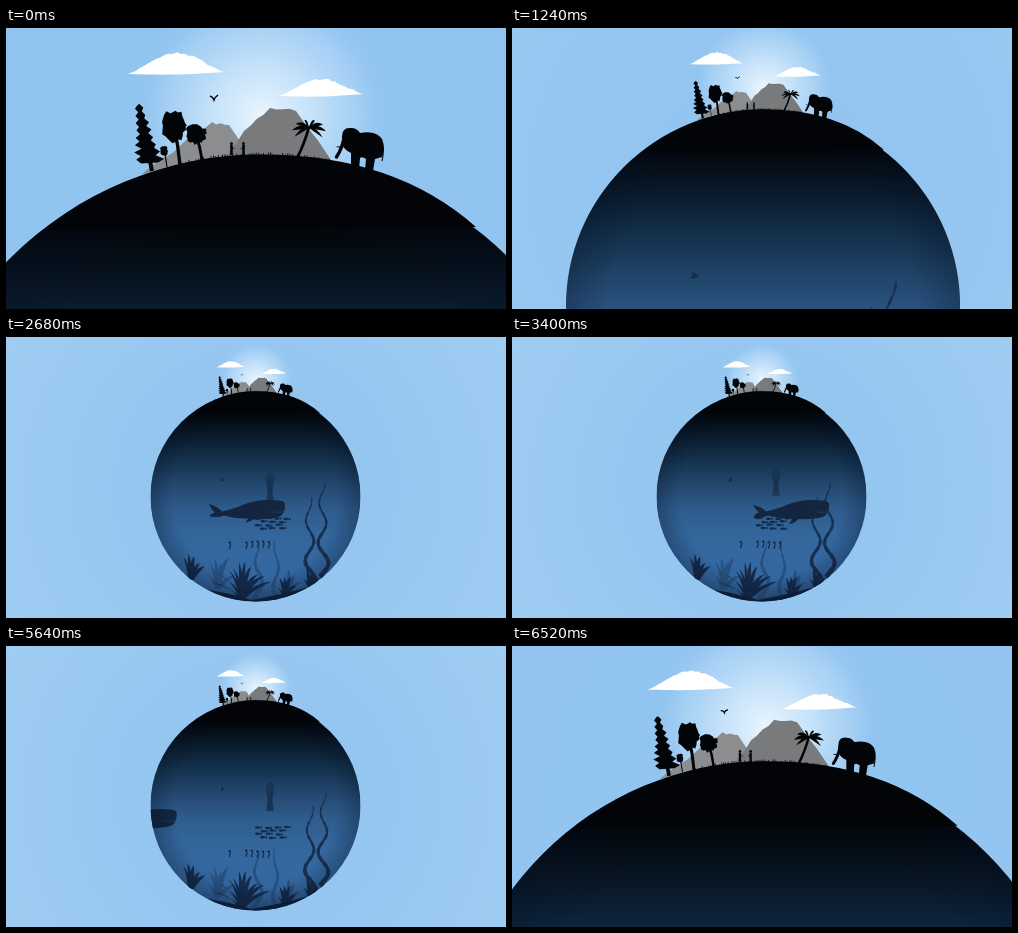
Animation of 500x281 px, one loop 6600 ms. Source, as an HTML page with a canvas:

```html
<!DOCTYPE html>
<html lang="en">
<head>
<meta charset="utf-8">
<title>Small planet</title>
<style>
html, body { margin: 0; width: 100%; height: 100%; overflow: hidden; background: #92c4f0; }
canvas { display: block; width: 100vw; height: 100vh; }
</style>
</head>
<body>
<canvas id="stage" width="500" height="281"></canvas>
<script>
const ctx = document.getElementById('stage').getContext('2d');
const LOOP = 6600, HOLD = 1000, STEP = 80;
const MAX = 3.36;                       // closest zoom
const FX = 247.75, FY = 23.8;           // fixed point of the zoom
const CX = 249.5, CY = 159.5, R = 105;  // planet at zoom 1
const INK = '#020407', DEEP = '#142a49', KELP = '#18304f', PALE = '#28507f';
const TAU = Math.PI * 2;

const clamp = v => Math.max(0, Math.min(1, v));
const ease = v => (1 - Math.cos(Math.PI * clamp(v))) / 2;
const mix = (a, b, u) => a + (b - a) * u;

// Repeatable noise in 0..1
function noise(n) {
  const v = Math.sin(n * 12.9898) * 43758.5453;
  return v - Math.floor(v);
}

function zoomAt(t) {
  const near = t < LOOP / 2 ? 1 - ease((t - 965) / 564) : ease((t - 6069) / 564);
  return { near, s: Math.pow(MAX, near) };
}

// Slow drift of the small creatures: out, then back
function driftAt(t) {
  return Math.min(clamp((t - 1300) / 3380), clamp((6200 - t) / 1400));
}

function view(k) {
  ctx.setTransform(k, 0, 0, k, FX * (1 - k), FY * (1 - k));
}

function fill(d, color) {
  ctx.fillStyle = color;
  ctx.fill(new Path2D(d));
}

function stroke(d, width, color) {
  ctx.strokeStyle = color;
  ctx.lineWidth = width;
  ctx.stroke(new Path2D(d));
}

function poly(points, color) {
  ctx.fillStyle = color;
  ctx.beginPath();
  points.forEach(([x, y]) => ctx.lineTo(x, y));
  ctx.fill();
}

function oval(x, y, rx, ry, color) {
  ctx.fillStyle = color;
  ctx.beginPath();
  ctx.ellipse(x, y, rx, ry, 0, 0, TAU);
  ctx.fill();
}

function radial(x, y, r0, r1, stops) {
  const g = ctx.createRadialGradient(x, y, r0, x, y, r1);
  stops.forEach(([p, c]) => g.addColorStop(p, c));
  return g;
}

// Pointed leaf bending from its root to its tip
function blade(x, y, tx, ty, w, color) {
  const mx = mix(x, tx, .4), my = mix(ty, y, .12);
  fill(`M${x - w} ${y} Q${mx - w} ${my} ${tx} ${ty} Q${mx + w} ${my + w * 2} ${x + w} ${y}Z`, color);
}

// ---------- sky and land, laid out at the closest zoom ----------
function drawSky(near) {
  ctx.setTransform(1, 0, 0, 1, 0, 0);
  ctx.fillStyle = '#92c4f0';
  ctx.fillRect(0, 0, 500, 281);
  ctx.globalAlpha = 1 - near;
  ctx.fillStyle = radial(250, 150, 90, 290, [[0, 'rgba(150,199,240,.5)'], [1, 'rgba(166,208,241,.7)']]);
  ctx.fillRect(0, 0, 500, 281);
  ctx.globalAlpha = 1;
}

function drawGlow() {
  ctx.fillStyle = radial(256, 88, 0, 130, [
    [0, 'rgba(245,251,255,.9)'], [.4, 'rgba(220,239,254,.68)'],
    [.75, 'rgba(185,220,248,.45)'], [1, 'rgba(146,196,240,0)']]);
  ctx.fillRect(110, -50, 290, 290);
}

function cloud(x, y, w, h, seed) {
  const top = [], base = [];
  for (let i = 0; i <= 24; i++) {
    const u = i / 24, jag = noise(seed + i);
    const hump = Math.pow(Math.sin(Math.PI * u), 1.3);
    top.push([x + w * u + 3 * (jag - .5), y - 2 * u - h * hump * (.85 + .15 * jag)]);
    base.unshift([x + w * u, y - 2 * u + 1.5 * Math.sin(Math.PI * u)]);
  }
  poly(top.concat(base), '#fff');
}

function drawBird(t) {
  const wing = t < HOLD ? -2 : Math.sin(t / 130) * 2;
  stroke(`M204 ${70 + wing} Q207 69 208 72 Q209 69 212 ${69 + wing}`, 1.5, INK);
}

// Rough ridge through a few key points
function ridge(keys, seed, color) {
  const points = [];
  for (let i = 1; i < keys.length; i++) {
    const [ax, ay] = keys[i - 1], [bx, by] = keys[i];
    for (let k = 0; k < 4; k++) {
      points.push([mix(ax, bx, k / 4), mix(ay, by, k / 4) + (k ? 4 * noise(seed + i * 4 + k) - 2 : 0)]);
    }
  }
  points.push(keys[keys.length - 1]);
  poly(points, color);
}

function drawMountains() {
  ridge([[136, 146], [177, 115], [206, 94], [223, 97], [262, 150]], 3, '#8c8d8e');
  ridge([[207, 146], [238, 103], [264, 80], [290, 83], [334, 146]], 9, '#787a7b');
}

function drawHill() {
  fill('M40 202 Q140 126 254 126.5 Q388 126 470 199Z', INK);
}

function drawGrass() {
  for (let x = 176; x < 326; x += 2.4) {
    const y = 127 + (x - 254) ** 2 / 700;
    stroke(`M${x} ${y + 2} l${noise(x) - .5} ${-2 - 3 * noise(x + 1)}`, .9, INK);
  }
}

function conifer(x, y, h, lean) {
  const left = [], right = [];
  for (let i = 0; i <= 16; i++) {
    const u = i / 16;
    const w = i % 2 ? 3 + 11 * u : 1 + 7 * u;
    const cy = y - h + u * h * .86, cx = x - lean * (y - cy);
    left.push([cx - w * (.85 + .3 * noise(i)), cy + 2]);
    right.unshift([cx + w * (.85 + .3 * noise(i + 40)), cy + 1]);
  }
  poly(left.concat(right), INK);
  stroke(`M${x - lean * h / 2} ${y - h / 2} L${x} ${y}`, 4, INK);
}

function roundTree(x, y, rx, ry, rootX, rootY, seed) {
  const crown = [];
  for (let a = 0; a < TAU; a += TAU / 26) {
    const k = .82 + .32 * noise(seed + a);
    crown.push([x + rx * k * Math.cos(a), y + ry * k * Math.sin(a)]);
  }
  poly(crown, INK);
  stroke(`M${x} ${y} Q${mix(x, rootX, .7)} ${mix(y, rootY, .5)} ${rootX} ${rootY}`, rx * .28, INK);
}

function drawPalm() {
  const x = 303, y = 99;
  stroke(`M291 130 Q298 117 ${x} ${y}`, 2.8, INK);
  for (let i = 0; i < 8; i++) {
    const a = -3.7 + i * .62;
    const tx = x + 17 * Math.cos(a), ty = y + 4 + 11 * Math.sin(a);
    const mx = mix(x, tx, .55), my = mix(y, ty, .5) - 3;
    fill(`M${x} ${y} Q${mx} ${my - 3} ${tx} ${ty} Q${mx} ${my + 4} ${x} ${y + 1}Z`, INK);
  }
}

function person(x, reach) {
  oval(x, 115.5, 1.4, 1.5, INK);
  stroke(`M${x} 117 V127`, 2.6, INK);
  stroke(`M${x} 119 l${reach} 2`, .8, INK);
}

function drawElephant(t) {
  const lift = ease((t - 3600) / 900) - ease((t - 4900) / 700);
  fill('M336 109 Q336 99 345 100 Q351 100 354 105 Q370 102 376 111 Q380 121 376 129 L369 131 L367 143 L359 143 L360 131 Q356 128 354 130 L353 142 L345 142 L345 125 Q338 122 336 116Z', INK);
  stroke('M374 112 Q379 122 376 133', 1.1, INK);
  ctx.lineCap = 'round';
  stroke(`M338.5 108 Q336 ${121 - 4 * lift} ${330.5 + 2 * lift} ${129 - 23 * lift}`, 3.4, INK);
  stroke('M338 117 Q334 120 331 119', 1, INK);
  ctx.lineCap = 'butt';
}

function drawLand(t) {
  drawHill();
  drawGrass();
  conifer(146, 143, 68, .2);
  roundTree(168, 98, 12, 16, 174, 137, 5);
  roundTree(190, 106, 10, 10, 196, 132, 12);
  roundTree(158, 123, 4, 5, 161, 139, 20);
  drawPalm();
  person(225.5, 3);
  person(237.5, -3);
  drawElephant(t);
}

// ---------- sea, laid out at zoom 1 ----------
function drawWater() {
  const g = ctx.createLinearGradient(0, CY - R, 0, CY + R);
  ['#010204', '#03070c', '#0a1d30', '#15334f', '#23486f', '#2e5b8b', '#33659a', '#3568a0', '#34669e', '#2c5888']
    .forEach((c, i, all) => g.addColorStop(i / (all.length - 1), c));
  ctx.fillStyle = g;
  ctx.fillRect(CX - R, CY - R, 2 * R, 2 * R);
}

// Wavy weed from its root up to its tip
function weed(x, root, tip, amp, width, color, t, phase) {
  ctx.strokeStyle = color;
  ctx.lineCap = 'round';
  let px = x, py = root;
  for (let y = root - 2; y >= tip; y -= 2) {
    const u = (root - y) / (root - tip);
    const nx = x + amp * Math.sin(y / 6.4 + phase) * (1 - .6 * u) + u * Math.sin(t / 700 + y / 25);
    ctx.lineWidth = width * (1.05 - .85 * u) + .5 * Math.sin(y * .9);
    ctx.beginPath();
    ctx.moveTo(px, py);
    ctx.lineTo(nx, y);
    ctx.stroke();
    px = nx; py = y;
  }
  ctx.lineCap = 'butt';
}

// Fan of leaves with uneven lengths
function fern(x, y, count, spread, height, color, t) {
  for (let i = 0; i < count; i++) {
    const side = 2 * i / (count - 1) - 1;
    const h = height * (1 - .45 * side * side) * (.7 + .4 * noise(x + i));
    blade(x, y, x + side * spread + .5 * Math.sin(t / 600 + i), y - h, 2.3, color);
  }
}

function drawBackWeeds(t) {
  weed(252, 264, 206, 5, 5, PALE, t, 1);
  weed(270, 262, 203, 3.5, 4, PALE, t, 3.4);
  fern(212, 252, 6, 17, 34, PALE, t);
  fern(283, 255, 5, 11, 22, PALE, t);
}

function drawFrontWeeds(t) {
  weed(304, 252, 160, 6, 4.2, KELP, t, 1.2);
  weed(317, 240, 145, 6, 4, KELP, t, 4);
  fern(185, 243, 6, 14, 27, DEEP, t);
  fern(236, 262, 10, 29, 38, DEEP, t);
  fern(279, 259, 5, 11, 25, DEEP, t);
  fern(304, 250, 4, 9, 20, DEEP, t);
  fill('M190 251 Q220 255 246 263 Q278 257 306 249 L290 270 L210 270Z', '#10233f');
}

function drawOctopus(t, drift) {
  const x = 264, y = 167 - 39 * Math.sqrt(drift);
  const open = clamp(1 - 4 * drift);
  ctx.globalAlpha = 1 - .7 * drift;
  oval(x, y, 4.4 + open, 6, KELP);
  ctx.lineCap = 'round';
  for (let i = 0; i < 6; i++) {
    const side = (i - 2.5) / 2.5;
    const wave = Math.sin(t / 260 + i * 2) * 1.5 * open;
    const tip = x + side * (3 + 7 * open) + wave;
    stroke(`M${x + side * 3} ${y + 4} Q${x + side * (1 + 9 * open)} ${y + 11} ${x + side * (2 + 4 * open)} ${y + 16} T${tip} ${y + 22}`, 1.9, KELP);
  }
  ctx.lineCap = 'butt';
  if (open > .5) [-2, 2].forEach(dx => oval(x + dx, y + 2, 1, 1, '#3d6494'));
  ctx.globalAlpha = 1;
}

function drawSchool(t, drift) {
  for (let i = 0; i < 13; i++) {
    const row = i % 4, col = Math.floor(i / 4);
    const x = 261 - 24 * drift + col * 9.5 + (row % 2) * 4 + 2 * noise(i);
    const y = 181.5 + row * 3.3 + .5 * Math.sin(t / 300 + i * 2);
    oval(x, y, 2.7, 1.25, DEEP);
    fill(`M${x + 2} ${y} l2.4 -1.4 v2.8Z`, DEEP);
  }
}

function seahorse(x, y) {
  oval(x, y, 1.3, 1, DEEP);
  stroke(`M${x} ${y} q1.6 3 0 4.5 q-1 1.5 .6 1.6`, 1.1, DEEP);
}

function drawSeahorses(t, drift) {
  const x = 214 + 24 * drift;
  for (let i = 0; i < 6; i++) {
    seahorse(x + (i ? 11 + i * 5.6 : 0), 205 + .6 * Math.sin(t / 350 + i));
  }
}

function drawRay(t, drift) {
  const x = 213 + 9 * drift, flap = Math.sin(t / 220);
  fill(`M${x + 2.5} 143 L${x - 1.5} ${140.5 - flap} L${x - 1} 143 L${x - 2} ${145 + flap} L${x} 144.5Z`, DEEP);
}

// Swims out past the right edge and comes in again on the left
function whaleX(t) {
  return t < 5400
    ? 169 + 110 * ease((t - 1500) / 3200) + 80 * clamp((t - 4700) / 700)
    : 66 + 101 * clamp((t - 5400) / 880);
}

function drawWhale(t) {
  const beat = Math.sin(t / 260) * 1.2, color = '#13253f';
  ctx.save();
  ctx.translate(whaleX(t), 172.5);
  fill(`M77 -6 Q76 -9 70 -9 Q50 -11 36 -5 Q24 0 14 2 Q11 -2 1 ${-5 + beat} Q3 0 7 3 Q1 5 2 ${8 + beat} Q10 9 16 6 Q26 9 38 9 Q60 11 72 7 Q78 3 77 -6Z`, color);
  fill(`M48 7 Q45 ${13 + beat} 37 ${14 + beat} Q40 11 41 7Z`, color);
  stroke('M76 2 Q70 4 63 2', .5, '#2b4c74');
  ctx.restore();
}

function drawPlanet(t) {
  const drift = driftAt(t);
  ctx.save();
  ctx.beginPath();
  ctx.arc(CX, CY, R, 0, TAU);
  ctx.clip();
  drawWater();
  drawBackWeeds(t);
  drawOctopus(t, drift);
  drawSchool(t, drift);
  drawSeahorses(t, drift);
  drawRay(t, drift);
  drawFrontWeeds(t);
  drawWhale(t);
  ctx.fillStyle = radial(CX, CY, 82, 107, [[0, 'rgba(3,12,30,0)'], [1, 'rgba(3,12,30,.3)']]);
  ctx.fillRect(CX - R, CY - R, 2 * R, 2 * R);
  ctx.restore();
}

function draw(time) {
  const raw = time % LOOP;
  const t = raw < HOLD ? 0 : HOLD + Math.floor((raw - HOLD) / STEP) * STEP;
  const { near, s } = zoomAt(t);
  drawSky(near);
  view(s / MAX);
  drawGlow();
  cloud(122, 46, 97, 21, 4);
  cloud(273, 68, 84, 17, 31);
  drawMountains();
  drawBird(t);
  view(s);
  drawPlanet(t);
  view(s / MAX);
  drawLand(t);
}

const start = performance.now();
function tick() {
  draw(performance.now() - start);
  requestAnimationFrame(tick);
}
tick();
</script>
</body>
</html>
```
